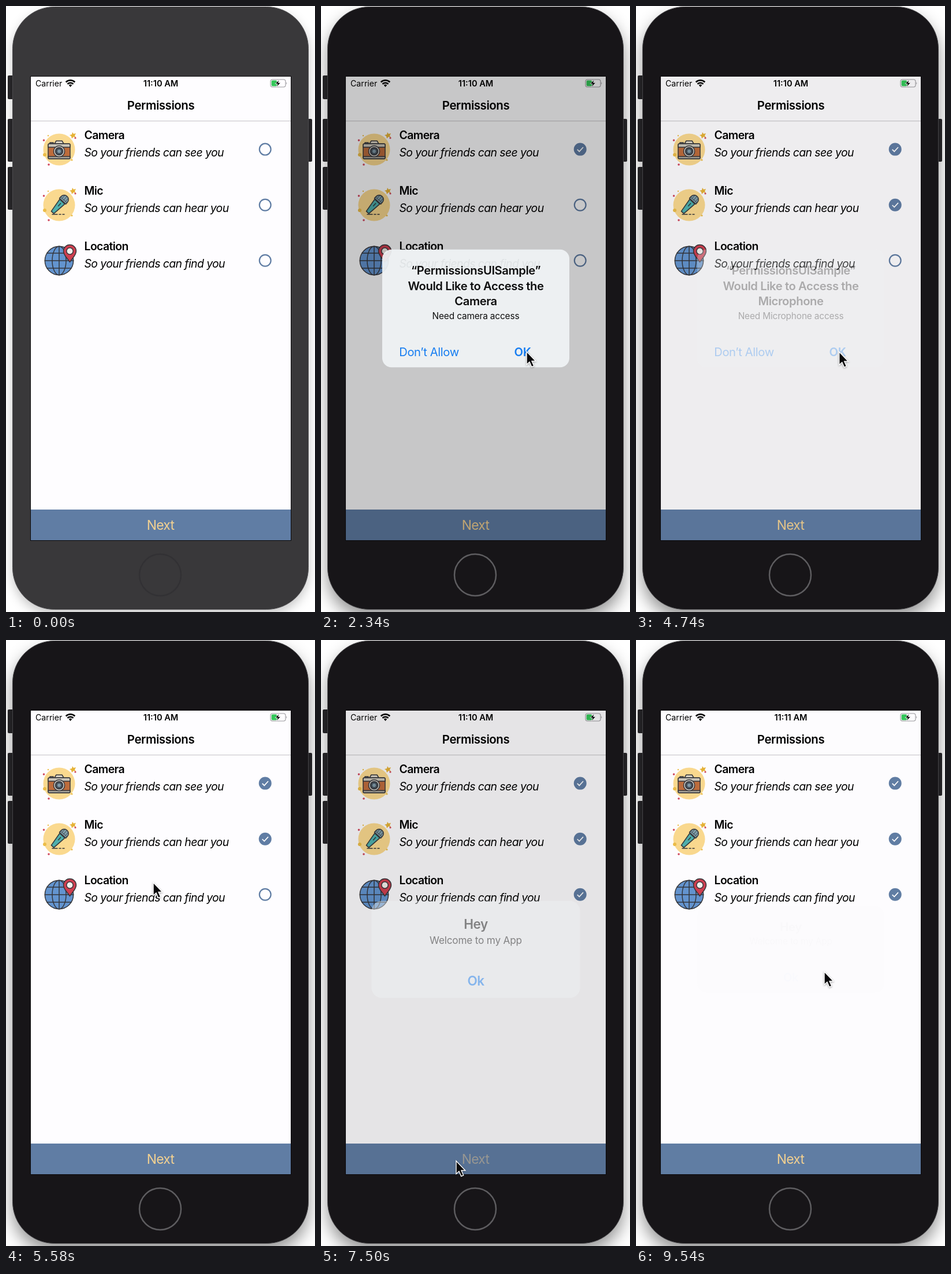
An HTML page for the animation above (9.6 s loop, 535 by 1047 pixels).

```html
<!DOCTYPE html>
<html lang="en">
<head>
<meta charset="utf-8">
<title>Permissions</title>
<style>
html, body { margin: 0; width: 100%; height: 100%; overflow: hidden; background: #fff; }
svg { display: block; width: 535px; height: 1047px; }
text { font-family: Inter, "Liberation Sans", sans-serif; white-space: pre; }
#body { fill: #39383a; stroke: #4d4c4f; filter: drop-shadow(0 8px 9px rgba(0,0,0,.22)); }
#home { fill: none; stroke: #323134; stroke-width: 2.5; }
.active #body { fill: #171518; stroke: #454447; filter: drop-shadow(0 14px 14px rgba(0,0,0,.42)); }
.active #home { stroke: #5e5d60; }
.ink { stroke: #35363b; stroke-width: 1.5; stroke-linejoin: round; stroke-linecap: round; }
</style>
</head>
<body>
<svg id="stage" viewBox="0 0 535 1047">
  <defs>
    <clipPath id="clip"><rect x="43" y="122" width="450" height="801"/></clipPath>
    <g id="badge">
      <circle r="27.5" fill="#fad98f"/>
      <path d="M23-30l2 3 4-1-2 4 2 3-4-1-3 3-1-4-3-2 4-1z" fill="#e6b236"/>
      <g fill="#ecbd49"><circle cx="-25" cy="9" r="3"/><circle cx="22" cy="18" r="1.6"/><circle cx="-19" cy="-24" r="1.2"/></g>
      <g fill="#d0475c"><circle cx="-26.500" cy="-16" r="1.8"/><circle cx="-18" cy="26" r="1.8"/><circle cx="28" cy="-20" r="1.6"/></g>
    </g>
  </defs>

  <g fill="#29282b">
    <rect x="3" y="120" width="12" height="41" rx="2"/>
    <rect x="3" y="195" width="12" height="74" rx="2"/>
    <rect x="3" y="278" width="12" height="74" rx="2"/>
    <rect x="518" y="195" width="12" height="74" rx="2"/>
  </g>
  <rect id="body" x="11.500" y="1.500" width="512" height="1041" rx="72"/>
  <circle id="home" cx="267" cy="983" r="36"/>
  <rect x="42" y="121" width="452" height="803" fill="#0b0a0c"/>

  <g clip-path="url(#clip)">
    <rect x="43" y="122" width="450" height="801" fill="#fefdff"/>
    <rect x="43" y="198" width="450" height="1.300" fill="#cfced2"/>
    <rect x="43" y="870" width="450" height="53" fill="#607da4"/>
    <g fill="none" stroke="#000" stroke-width="2.6">
      <path d="M103.700 131.500a11 11 0 0 1 15.600 0M106.500 134.800a7 7 0 0 1 10 0"/>
      <path d="M108.800 136.800a3.800 3.800 0 0 1 5.400 0l-2.700 3.200z" fill="#000" stroke="none"/>
    </g>
    <rect x="458" y="127" width="26" height="13" rx="3.500" fill="none" stroke="#98979b" stroke-width="1.100"/>
    <path d="M485.300 131.500q2 2 0 4z" fill="#98979b"/>
    <rect x="459.600" y="128.600" width="9.500" height="9.800" rx="2" fill="#33c658"/>
    <path d="M473 127.500l-7 7h4l-1.500 5.500 7-7.500h-4z" fill="#000" stroke="#fefdff" stroke-width=".8"/>

    <g transform="translate(92 248)">
      <use href="#badge"/>
      <g class="ink">
        <path d="M-8-10l3-5h10l3 5z" fill="#d8d2c4"/>
        <path d="M-16-12h6v3h-6z" fill="#8d8c8a"/>
        <rect x="-19" y="-10" width="38" height="26" rx="2.500" fill="#bd6c3c"/>
        <path d="M-19-4v-4q0-2 2-2h34q2 0 2 2v4z" fill="#c9c4b8"/>
        <path d="M-19 12h38v2q0 2-2 2h-34q-2 0-2-2z" fill="#a9a59c"/>
        <circle cy="3" r="9.500" fill="#d6d3cc"/>
        <circle cy="3" r="6.500" fill="#44505b"/>
      </g>
      <circle cy="3" r="3" fill="#7f98a6"/>
    </g>

    <g transform="translate(92 344)">
      <use href="#badge"/>
      <g class="ink">
        <g transform="rotate(42)">
          <path d="M-6-8h12l-3 25h-6z" fill="#4fb0ad"/>
          <path d="M-7.500-9v-4a7.500 7.500 0 0 1 15 0v4z" fill="#7f9fab"/>
          <path d="M-7.500-12h15M-4-19v7M0-20v8M4-19v7" fill="none" stroke-width=".8"/>
          <path d="M0-4v6" fill="none"/>
        </g>
        <path d="M-12 16h9m3 0h3m3 0h3" fill="none"/>
      </g>
    </g>

    <g class="ink" transform="translate(92 440)" fill="none">
      <circle r="24.700" fill="#6394cf"/>
      <ellipse rx="12" ry="24.700"/>
      <path d="M0-24.700V24.700M-24.700 0H24.700M-21-13H21M-21 13H21"/>
      <path d="M18.500 2.500C14-5 7.500-9 7.500-16.500a11 11 0 0 1 22 0C29.500-9 23 -5 18.500 2.500z" fill="#cf3f50"/>
      <circle cx="18.500" cy="-16.500" r="5.700" fill="#f5efec"/>
    </g>

    <g id="labels"></g>
    <g id="checks"></g>
    <rect id="dim" x="43" y="122" width="450" height="801"/>
    <g id="alerts"></g>
  </g>

  <path id="cursor" d="M0 0V22.500L5 18 8.700 26.500 12.700 24.800 9 16.500H15.800z" fill="#0a090b" stroke="#fff" stroke-width="1.400" style="filter:drop-shadow(0 1.500px 1.500px rgba(0,0,0,.35))"/>
</svg>
<script>
const LOOP = 9600;
const $ = id => document.getElementById(id);

// Text centred vertically on cy; spacing is in em.
function label(x, cy, str, size, { weight = 400, anchor = 'middle', fill = '#000', spacing = -.02, extra = '' } = {}) {
  return `<text x="${x}" y="${cy + size * .36}" font-size="${size}" font-weight="${weight}" text-anchor="${anchor}" fill="${fill}" letter-spacing="${spacing * size}" ${extra}>${str}</text>`;
}

const rows = [
  { name: 'Camera', verb: 'see', checkedAt: 2270 },
  { name: 'Mic', verb: 'hear', checkedAt: 4570 },
  { name: 'Location', verb: 'find', checkedAt: 6270 }
];
const asks = name => ['“PermissionsUISample”', 'Would Like to Access the', name];
const alerts = [
  { from: 1300, to: 2317, cy: 522.5, title: asks('Camera'), msg: 'Need camera access', buttons: ['Don’t Allow', '*OK'], split: true },
  { from: 3530, to: 4600, cy: 522.5, title: asks('Microphone'), msg: 'Need Microphone access', buttons: ['Don’t Allow', '*OK'], split: true },
  { from: 5660, to: 6300, cy: 522.5, title: ['Allow', '“PermissionsUISample” to', 'access your location?'], msg: 'New location', buttons: ['*Allow While Using App', 'Allow Once', 'Don’t Allow'] },
  { from: 7420, to: 9185, cy: 534.5, title: ['Hey'], msg: 'Welcome to my App', buttons: ['*Ok'] }
];
const welcome = alerts[3];

// Cursor tip: time, x, y
const path = [
  [60, 1, 85], [980, 300, 250], [1480, 300, 250], [2150, 356, 597], [2420, 356, 597],
  [3250, 303, 344], [3760, 303, 344], [4400, 352, 598], [4720, 352, 598],
  [5450, 255, 419], [5700, 255, 419], [6080, 274.5, 542], [6400, 274.5, 542],
  [7200, 234, 900], [8250, 234, 900], [8950, 326, 573], [LOOP, 326, 573]
];

function alertMarkup(a) {
  const row = 53.3, lead = 26.5;
  const extra = lead * (a.title.length - 1);
  const head = 97 + extra;
  const h = head + row * (a.split ? 1 : a.buttons.length);
  const top = -h / 2;
  let out = `<rect x="-162" y="${top}" width="324" height="${h}" rx="16" fill="#f0f4f6"/>`;
  a.title.forEach((s, i) => out += label(0, top + 36 + i * lead, s, 20.2, { weight: 600 }));
  out += label(0, top + 61.5 + extra, a.msg, 15.4, { spacing: -.01 });
  let lines = '';
  a.buttons.forEach((s, i) => {
    const y = top + head + (a.split ? 0 : i * row);
    const bold = s[0] === '*';
    out += label(a.split ? i * 162 - 81 : 0, y + row / 2, s.replace('*', ''), 20.2, { weight: bold ? 600 : 400, fill: '#0a78f5' });
    lines += `M-162 ${y}h324`;
  });
  if (a.split) lines += `M0 ${top + head}v${row}`;
  return `<g>${out}<path d="${lines}" stroke="#bfc3c6" stroke-width="1"/></g>`;
}

$('labels').innerHTML =
  label(51, 133.7, 'Carrier', 14.2, { anchor: 'start', spacing: 0 }) +
  label(268, 133.7, '11:10 AM', 14.6, { weight: 600, spacing: 0, extra: 'id="clock"' }) +
  label(268, 172, 'Permissions', 20.4, { weight: 600 }) +
  label(267.5, 897, 'Next', 22.8, { spacing: -.03, extra: 'id="next"' }) +
  rows.map((r, i) => {
    const y = 223 + i * 96.1;
    return label(135.5, y, r.name, 19.4, { weight: 600, anchor: 'start', spacing: -.03 }) +
      label(135.5, y + 29.7, `So your friends can ${r.verb} you`, 19.4, { anchor: 'start', spacing: -.03, extra: 'font-style="italic"' });
  }).join('');

$('checks').innerHTML = rows.map((r, i) =>
  `<g transform="translate(448.700 ${247.6 + i * 96.1})"><circle r="9.900" stroke="#607da4" stroke-width="2.200"/><path d="M-5 .3l3.500 3.500L5.300-3.600" fill="none" stroke="#fff" stroke-width="1.700"/></g>`).join('');
$('alerts').innerHTML = alerts.map(alertMarkup).join('');

// Critically damped spring from 0 to 1
function spring(ms) {
  const u = Math.max(0, ms) * .018;
  return 1 - (1 + u) * Math.exp(-u);
}

function cursorAt(t) {
  const i = Math.max(1, path.findIndex(k => k[0] > t));
  const [a, b] = [path[i - 1], path[i]];
  const u = Math.max(0, (t - a[0]) / (b[0] - a[0]));
  const e = u * u * (3 - 2 * u);
  return [a[1] + (b[1] - a[1]) * e, a[2] + (b[2] - a[2]) * e];
}

function draw(t) {
  $('stage').classList.toggle('active', t >= 1110);
  $('clock').textContent = t < 8800 ? '11:10 AM' : '11:11 AM';
  $('next').setAttribute('fill', t >= welcome.from && t < welcome.to ? '#a8a7a2' : '#f3d191');

  rows.forEach((r, i) => {
    const [ring, tick] = $('checks').children[i].children;
    const on = t >= r.checkedAt;
    ring.setAttribute('fill', on ? '#607da4' : 'none');
    tick.style.display = on ? '' : 'none';
  });

  let dim = 0;
  alerts.forEach((a, i) => {
    const g = $('alerts').children[i];
    const shown = spring(t - a.from);
    const alpha = shown * (1 - spring(t - a.to));
    dim = Math.max(dim, alpha);
    g.style.display = alpha > .002 ? '' : 'none';
    g.setAttribute('opacity', alpha > .99 ? 1 : alpha);
    g.setAttribute('transform', `translate(268 ${a.cy}) scale(${1.2 - .2 * shown})`);
    g.lastChild.style.display = alpha > .99 ? '' : 'none';
  });
  $('dim').setAttribute('opacity', dim * .23);

  $('cursor').style.display = t < 60 ? 'none' : '';
  $('cursor').setAttribute('transform', `translate(${cursorAt(t)})`);
}

const start = performance.now();
function tick() {
  draw((performance.now() - start) % LOOP);
  requestAnimationFrame(tick);
}
tick();
</script>
</body>
</html>
```
